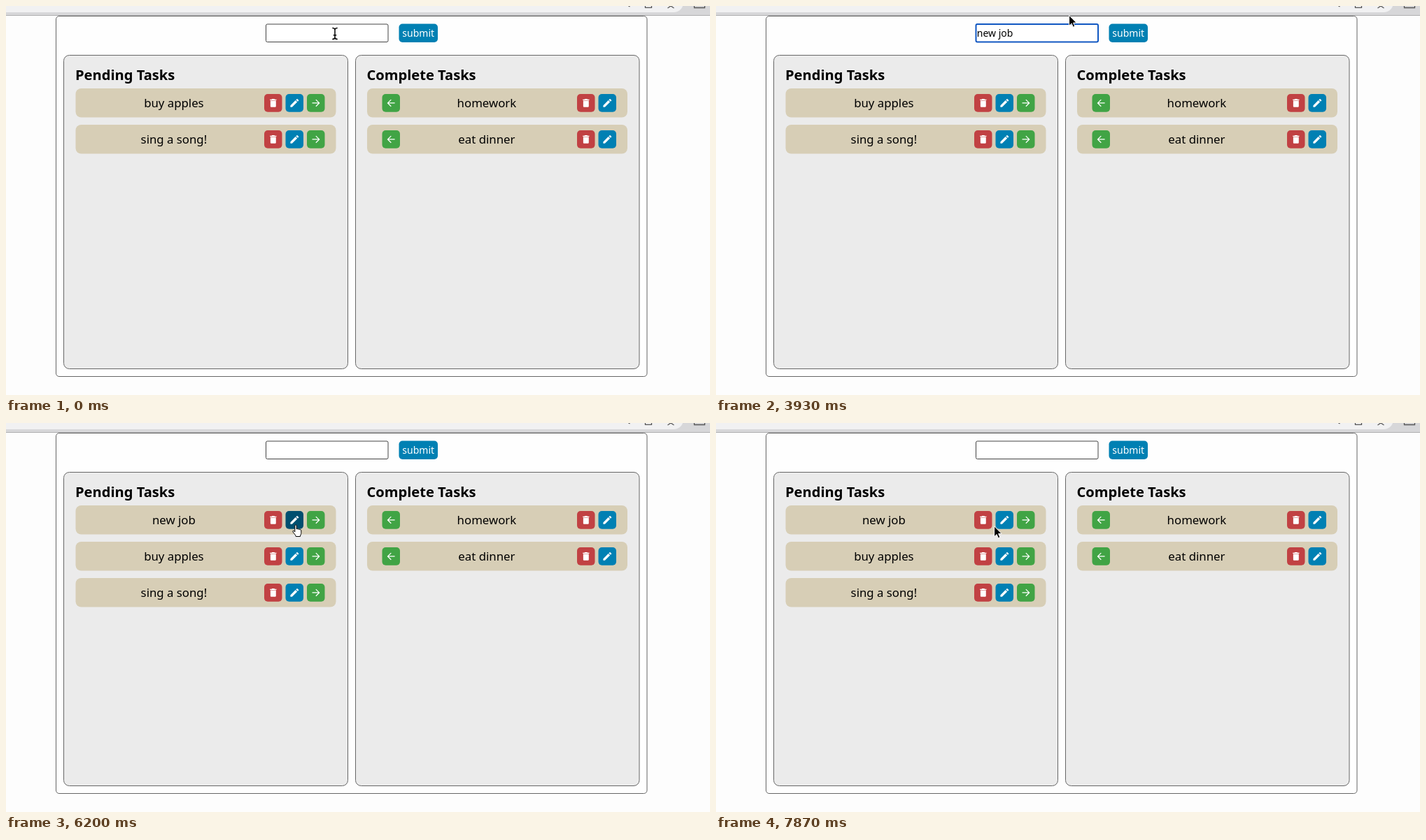
Recreate the animation shown at these times as an HTML page. Size 1006 by 557 pixels, loop 8000 ms.

```html
<!DOCTYPE html>
<html lang="en">
<head>
<meta charset="utf-8">
<title>Task list</title>
<style>
  html, body { margin: 0; width: 100%; height: 100%; overflow: hidden; background: #fdfdfd; }
  svg { display: block; width: 100vw; height: 100vh; font-family: "Noto Sans", "Open Sans", sans-serif; }
  text { white-space: pre; }
  .heading { font-size: 20.1px; font-weight: 700; }
  .task { font-size: 16.8px; text-anchor: middle; }
  .small { font-size: 14px; }
  .panel { fill: #ebebeb; stroke: #666; }
  .row { fill: #d7ceb6; }
  .red { fill: #c14143; }
  .blue { fill: #0080b3; }
  .green { fill: #41a445; }
  .hover { filter: brightness(.62); }
  .icon { fill: #fff; }
  .line { fill: none; stroke: #fff; stroke-width: 1.9; }
  .field { fill: #fff; stroke: #444; }
  .focus { stroke: #1057c2; stroke-width: 2; }
  .chrome { fill: none; stroke: #555; stroke-width: 1.3; }
</style>
</head>
<body>
<svg viewBox="0 0 1006 557">
  <defs>
    <path id="trash" class="icon" d="M6 19c0 1.1.9 2 2 2h8c1.1 0 2-.9 2-2V7H6zM19 4h-3.500l-1-1h-5l-1 1H5v2h14z"/>
    <path id="pencil" class="icon" d="M3 17.250V21h3.750L17.810 9.940l-3.750-3.750zM20.710 7.040c.39-.39.39-1.020 0-1.410l-2.340-2.340c-.39-.39-1.020-.39-1.410 0l-1.830 1.830 3.750 3.750z"/>
    <path id="right" class="line" d="M4 12H19M12 4.700l7.300 7.300-7.300 7.300"/>
    <path id="left" class="line" d="M20 12H5M12 4.700L4.700 12l7.300 7.300"/>
  </defs>

  <rect width="1006" height="557" fill="#fdfdfd"/>
  <rect width="1006" height="13" fill="#d7d7d9"/>
  <rect x="-30" y="-19" width="998" height="28" rx="14" fill="#f1f1f2"/>
  <rect y="13" width="1006" height="1" fill="#aeaeb0"/>
  <path class="chrome" d="M888.500 -1l3 2M913.500 -1V2.300H922.500V-1M945.500 3L950 0l4.500 3M983.500 -1V2.500H998.500V-1"/>

  <rect x="71.500" y="14.500" width="844.500" height="516" rx="4.500" fill="#fefefe" stroke="#666"/>
  <rect class="panel" x="82.500" y="70.500" width="406" height="449" rx="8"/>
  <rect class="panel" x="499.500" y="70.500" width="405.500" height="449" rx="8"/>
  <text class="heading" x="99" y="105.500">Pending Tasks</text>
  <text class="heading" x="515.500" y="105.500">Complete Tasks</text>

  <rect id="field" class="field" x="371.500" y="26" width="174.500" height="25.500" rx="2"/>
  <text id="typed" class="small" x="372.800" y="44"></text>
  <rect id="caret" y="30" width="1" height="17"/>
  <rect id="submit" class="blue" x="561.500" y="25.500" width="55.500" height="26.500" rx="5"/>
  <text class="small" x="589.200" y="44" text-anchor="middle" fill="#fff">submit</text>

  <g id="rows"></g>
  <g id="edit">
    <rect class="field focus" x="153" y="130" width="174" height="19" rx="2"/>
    <text class="small" x="154" y="144.500">new job</text>
    <rect id="editCaret" x="154" y="131" width="1" height="17"/>
  </g>

  <g id="arrow"><path d="M.6 .8V15.800L4.100 12.500 6.300 17.700 8.800 16.600 6.600 11.600H11.200Z" stroke="#fff"/></g>
  <g id="hand"><path transform="translate(-4.400 -.5)" fill="#fff" stroke="#000" stroke-linejoin="round"
    d="M3.200 1.500c0-1.600 2.400-1.600 2.400 0V6.500c.5-1 2.200-.8 2.300.3.600-.8 2.100-.5 2.200.6.800-.6 2.100-.2 2.100 1V12c0 2-1.200 2.600-1.400 5H4.600C4.400 14.500 1.500 12.500.4 10.300-.3 8.800 1.300 8.200 2.200 9.200l1 1.200Z"/></g>
  <g id="beam" fill="none" stroke="#000" stroke-width="1.500">
    <path d="M-3.700 -8Q-.5 -8 0 -6Q.5 -8 3.700 -8M0 -6V6M-3.700 8Q-.5 8 0 6Q.5 8 3.700 8M-2.200 2.200H2.200"/></g>
</svg>
<script>
const LOOP = 8000, FPS = 15;
const $ = id => document.getElementById(id);
const show = (id, on) => $(id).style.display = on ? '' : 'none';
const within = (k, ...spans) => spans.some(([a, b]) => k >= a && k < b);

const button = (x, y, color, icon) => `
  <rect class="${color}" x="${x}" y="${y + 8}" width="25.5" height="25.8" rx="5"/>
  <use href="#${icon}" transform="translate(${x + 4.9} ${y + 13}) scale(.66)"/>`;

function row(name, y, done) {
  const x = done ? 516 : 99.5;
  const buttons = done
    ? button(537.5, y, 'green', 'left') + button(816, y, 'red', 'trash') + button(846.5, y, 'blue', 'pencil')
    : button(369, y, 'red', 'trash') + button(399.5, y, 'blue', 'pencil') + button(430, y, 'green', 'right');
  return `<rect class="row" x="${x}" y="${y}" width="372" height="41.5" rx="8"/>
    <text class="task" x="${x + 140.4 + (done ? 30.5 : 0)}" y="${y + 27}">${name}</text>${buttons}`;
}

$('rows').innerHTML =
  `<g id="fresh">${row('new job', 118)}</g>
   <g id="older">${row('buy apples', 118)}${row('sing a song!', 170)}</g>
   ${row('homework', 118, true)}${row('eat dinner', 170, true)}`;

const freshText = document.querySelector('#fresh text');
const [, trash, pencil, next] = document.querySelectorAll('#fresh rect');
const hoverable = [$('submit'), trash, pencil, next];

const word = 'new job';
const keyTicks = [25, 29, 31, 34, 47, 49, 51];

// tick, x, y of the pointer
const path = [
  [0, 470, 39.5], [58, 470, 39.5], [59, 504, 12.5], [62, 538, 3], [65, 575, 14], [67, 595, 33], [69, 602, 44],
  [81, 602, 44], [83, 586, 66], [86, 543, 113], [89, 486, 154], [91, 445, 158], [93, 414, 146], [94, 411, 139],
  [98, 411, 139], [100, 386, 124], [102, 359, 118], [105, 290, 130], [108, 258, 134],
  [114, 258, 134], [115, 285, 138], [117, 380, 148], [118, 397, 147], [120, 397, 147]
];

function pointer(k) {
  const i = Math.max(1, path.findIndex(p => p[0] >= k));
  const [a, ax, ay] = path[i - 1], [b, bx, by] = path[i];
  const f = (k - a) / (b - a);
  return [ax + (bx - ax) * f, ay + (by - ay) * f];
}

const inside = (x, y, l, t, w, h) => x >= l && x <= l + w && y >= t && y <= t + h;
const over = (el, x, y) =>
  inside(x, y, ...['x', 'y', 'width', 'height'].map(n => +el.getAttribute(n)));

function draw(t) {
  const k = Math.floor((t + 3.4) * FPS / 1000);
  const added = k >= 75, editing = within(k, [98, 110]);

  $('field').classList.toggle('focus', within(k, [1, 72]));
  $('typed').textContent = added ? '' : word.slice(0, keyTicks.filter(n => n <= k).length);
  show('caret', within(k, [1, 8], [15, 23], [25, 43], [47, 59], [66, 72]));
  $('caret').setAttribute('x', 373 + Math.round($('typed').getComputedTextLength()));

  show('fresh', added);
  $('older').setAttribute('transform', `translate(0 ${added ? 52 : 0})`);
  freshText.style.display = editing ? 'none' : '';
  show('edit', editing);
  show('editCaret', within(k, [98, 106]));

  const [x, y] = pointer(k);
  let hit = false;
  for (const el of hoverable) {
    const on = over(el, x, y) && (el.id === 'submit' || added);
    el.classList.toggle('hover', on);
    hit = hit || on;
  }
  const onText = over($('field'), x, y) || (added && inside(x, y, editing ? 152 : 209, 129, editing ? 176 : 62, 21));
  const kind = within(k, [25, 59]) ? '' : hit ? 'hand' : onText ? 'beam' : 'arrow';
  for (const id of ['arrow', 'hand', 'beam']) {
    show(id, id === kind);
    $(id).setAttribute('transform', `translate(${x} ${y})`);
  }
}

const start = performance.now();
function tick() {
  draw((performance.now() - start) % LOOP);
  requestAnimationFrame(tick);
}
tick();
</script>
</body>
</html>
```
